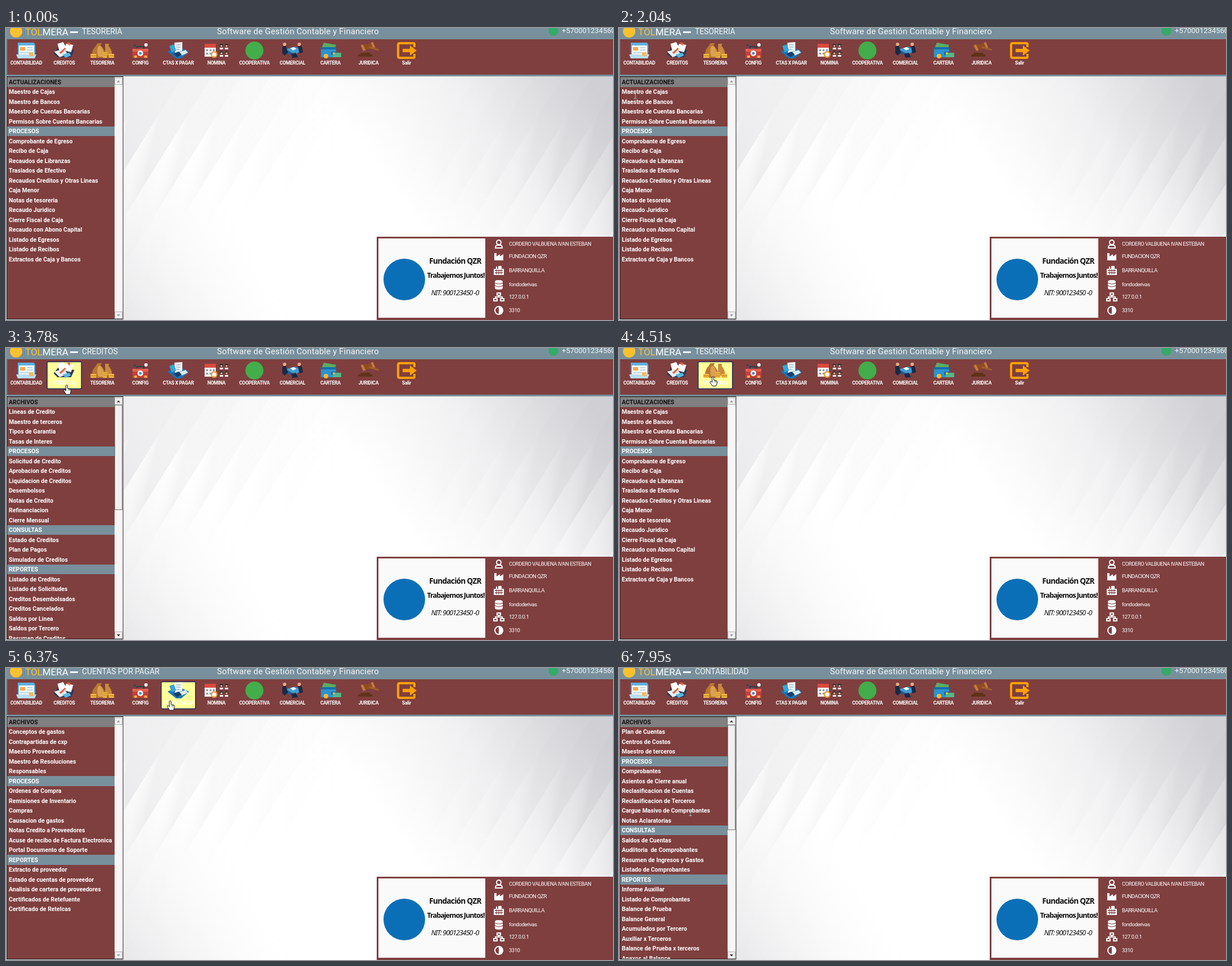
Animation, 1079 px wide and 519 px high, one loop 8 s. Source, as an HTML page:

```html
<!DOCTYPE html>
<html lang="es">
<head>
<meta charset="utf-8">
<title>Software de Gestión Contable</title>
<style>
html, body { margin: 0; width: 100%; height: 100%; overflow: hidden; background: #78909c; }
svg { display: block; font-family: Roboto, "Liberation Sans", sans-serif; }
text { white-space: pre; }
.bar { font-size: 14px; fill: #f1f5f6; }
.row { font: bold 10.5px Roboto, sans-serif; fill: #fff; }
.label { font: bold 8.6px Roboto, sans-serif; letter-spacing: -.3px; text-anchor: middle; fill: #fff; }
.info { font-size: 9.6px; letter-spacing: -.52px; fill: #fff; }
.card { font-family: "Noto Sans", "Open Sans", sans-serif; fill: #111; text-anchor: middle; }
</style>
</head>
<body>
<svg id="stage" width="1079" height="519" viewBox="0 0 1079 519"></svg>
<script>
const RED = '#7f3f3f', SLATE = '#78909c';
const rect = (x, y, w, h, fill, more = '') =>
  `<rect x="${x}" y="${y}" width="${w}" height="${h}" fill="${fill}" ${more}/>`;
const path = (fill, d, more = '') => `<path fill="${fill}" d="${d}" ${more}/>`;
const line = (color, d, width) => path('none', d, `stroke="${color}" stroke-width="${width}"`);
const disc = (x, y, r, fill) => `<circle cx="${x}" cy="${y}" r="${r}" fill="${fill}"/>`;
const text = (x, y, cls, s, more = '') => `<text x="${x}" y="${y}" class="${cls}" ${more}>${s}</text>`;
const at = (x, y, s) => `<g transform="translate(${x} ${y})">${s}</g>`;

// A leading * marks a section heading.
const lists = {
  'TESORERIA': '*ACTUALIZACIONES|Maestro de Cajas|Maestro de Bancos|Maestro de Cuentas Bancarias|Permisos Sobre Cuentas Bancarias|*PROCESOS|Comprobante de Egreso|Recibo de Caja|Recaudos de Libranzas|Traslados de Efectivo|Recaudos Creditos y Otras Lineas|Caja Menor|Notas de tesoreria|Recaudo Juridico|Cierre Fiscal de Caja|Recaudo con Abono Capital|Listado de Egresos|Listado de Recibos|Extractos de Caja y Bancos',
  'CONTABILIDAD': '*ARCHIVOS|Plan de Cuentas|Centros de Costos|Maestro de terceros|*PROCESOS|Comprobantes|Asientos de Cierre anual|Reclasificacion de Cuentas|Reclasificacion de Terceros|Cargue Masivo de Comprobantes|Notas Aclaratorias|*CONSULTAS|Saldos de Cuentas|Audiitoria  de Comprobantes|Resumen de Ingresos y Gastos|Listado de Comprobantes|*REPORTES|Informe Auxiliar|Listado de Comprobantes|Balance de Prueba|Balance General|Acumulados por Tercero|Auxiliar x Terceros|Balance de Prueba x terceros|Anexos al Balance',
  'CREDITOS': '*ARCHIVOS|Lineas de Credito|Maestro de terceros|Tipos de Garantia|Tasas de Interes|*PROCESOS|Solicitud de Credito|Aprobacion de Creditos|Liquidacion de Creditos|Desembolsos|Notas de Credito|Refinanciacion|Cierre Mensual|*CONSULTAS|Estado de Creditos|Plan de Pagos|Simulador de Creditos|*REPORTES|Listado de Creditos|Listado de Solicitudes|Creditos Desembolsados|Creditos Cancelados|Saldos por Linea|Saldos por Tercero|Resumen de Creditos',
  'CONFIGURACION': '*CONFIGURACION|Maestro de Usuarios|Maestro de Fuentes|Control de Consecutivos|Actualizacion Global Consecutivos|Datos de la Empresa|Parametros|Permisos sobre sucursales|Cambiar clave|Permisos a usuarios|Copia de Seguridad|Maestro de Retenciones|Maestro de Actividades Economicas|Maestro de Resoluciones de Facturacion|Revision de Parametros|Temas de Fondo|Maestro de UVT',
  'CUENTAS POR PAGAR': '*ARCHIVOS|Conceptos de gastos|Contrapartidas de cxp|Maestro Proveedores|Maestro de Resoluciones|Responsables|*PROCESOS|Ordenes de Compra|Remisiones de Inventario|Compras|Causacion de gastos|Notas Credito a Proveedores|Acuse de recibo de Factura Electronica|Portal Documento de Soporte|*REPORTES|Extracto de proveedor|Estado de cuentas de proveedor|Analisis de cartera de proveedores|Certificados de Retefuente|Certificado de ReteIcas'
};

const labels = ['CONTABILIDAD', 'CREDITOS', 'TESORERIA', 'CONFIG', 'CTAS X PAGAR', 'NOMINA',
  'COOPERATIVA', 'COMERCIAL', 'CARTERA', 'JURIDICA', 'Salir'];
const buttonX = i => 36 + 67.6 * i;

// Toolbar pictures, drawn around their own centre.
const icons = [
  path('#5fb0e0', 'M-15-14h29l2 5v17h-31z') + path('#f3f8fb', 'M-13-9h27v16h-27z') +
    path('#f5a94a', 'M-11-6h9v6h-9z') + line('#a9c9dc', 'M1-5h10M1-1h10M-11 4h22', 1.5) +
    path('#b9dff2', 'M-18 7h36l-3 7h-30z') + path('#f7b863', 'M5 3h8v7h-8z'),
  path('#2f3b52', 'M-19 5l8-10 29 4-6 13h-24z') + path('#fff', 'M-12-12l10-3 6 11-13 4zM3-12l13 2-4 13-12-3z') +
    path('#e9eef2', 'M-18 2l17-5 7 9-14 6z') + path('#e7663e', 'M-9 4l10-9 2 2-9 9zM5-14h6l-2 6z') + path('#5bb7dd', 'M-3 7l12-3 3 5-10 4z'),
  path('#b87830', 'M-9-13h8l-2 4q9 8 8 18l-3 4h-18q-6-10 5-22z') + path('#dba050', 'M-7-8h4q7 9 5 19h-9q-4-10 0-19z') +
    path('#c98a3c', 'M5-12h7l-1 4q7 7 6 17h-12z') + path('#f0b840', 'M-21 6h10v7h-10zM1 3h8v10h-8zM11 6h10v7h-10z') +
    line('#b9771e', 'M-21 9.5h10M1 6h8m-8 3.5h8m2 0h10', 1),
  path('#c93f39', 'M-14-3h28v16h-28z') + path('#e4614f', 'M-14-3h28v5h-28z') + line('#343d4d', 'M-6-3v-4h12v4', 2) +
    disc(0, 5, 5, '#fff') + disc(0, 5, 2.5, '#4a90b8') + disc(10, -10, 3, '#eef1f3') + disc(-10, -9, 2, '#32475b') + path('#f2b544', 'M-11 9h5v4h-5zM7 9h5v4h-5z'),
  path('#1877b7', 'M-19 2l18-9 20 9-14 12h-9z') + path('#f1f5f8', 'M-7-14l14-1v16l-13 3z') + path('#35a6dc', 'M-16-8l8-3 4 11-8 3z') +
    line('#7897ac', 'M-4-10h8m-8 4h8m-8 4h6', 1) + path('#d9eaf2', 'M2 3l11-4 4 5-11 5z') + path('#173f68', 'M-9 6l9-4 6 5-8 5z'),
  path('#f4f4f4', 'M-21-12h20v23h-20z') + path('#d94b3f', 'M-21-12h20v7h-20z') + path('#8697a5', 'M-18-2h3v3h-3zm6 0h3v3h-3zm6 0h3v3h-3zM-18 4h3v3h-3zm6 0h3v3h-3z') +
    disc(-4, 7, 6, '#f29b38') + disc(-4, 7, 3.5, '#fff') +
    [[9, -9], [18, -9], [9, 4], [18, 4]].map(([x, y]) => disc(x, y, 3, '#292b32') + disc(x, y + 1, 1.8, '#f1b68c') + path('#e8edf0', `M${x - 3} ${y + 4}h6v3h-6z`)).join(''),
  disc(0, 0, 16, '#43ad4b'),
  path('#3f9bd1', 'M-13-2l17-5 14 6-13 8z') + path('#215c91', 'M-13-2l18 9v4l-18-8z') + path('#192945', 'M-18-7l6-2 4 13-6 5-4-4zM10-7l6-2 3 12-7 2zM-2 6l8-2 4 8-10 1z') +
    disc(-14, -11, 3, '#e8ad86') + disc(12, -11, 3, '#e8ad86') + path('#fff', 'M-4-4l6-2 5 3-6 3z'),
  path('#59ae61', 'M-12-14l22 4-3 10-23-3z') + path('#2d93ce', 'M-17-6h27v18h-27z') + path('#176da8', 'M-17-6h27v4h-27zM1 2h10v6h-10z') +
    path('#55b68b', 'M4 4h15v8h-15z') + disc(-8, 10, 4, '#f3bb36') + disc(6, 5, 2, '#f3bb36'),
  path('#8d4e20', 'M-12-9l16-4 4 8-16 4z') + path('#c8793b', 'M-14-9l4-2 5 10-4 2zM4-14l4-1 4 10-4 1z') +
    line('#a65f2a', 'M1-6L18-1', 3) + path('#603315', 'M-18 7h25v4h-25zM-14 4h17v3h-17z'),
  line('#ffa000', 'M14-6V-11Q14-13 12-13H-12Q-15-13-15-10V10Q-15 13-12 13H12Q14 13 14 11V6', 4) + path('#ffa000', 'M-7-3H6v-6L18 0 6 9V3H-7z')
];

const infoIcons = [
  line('#fff', 'M-4-3a4 4 0 1 0 8 0a4 4 0 1 0-8 0M-6 7q0-5 3-5h6q3 0 3 5z', 2),
  path('#fff', 'M-8-6h4v6l6-4v4l6-4v11h-16z'),
  path('#fff', 'M-9-3h4v-4h2v4h2v-5h6v5h4v11h-18z') + line(RED, 'M-7 0h14m-14 4h14', 1.5) + line(RED, 'M-4-2v9m4-9v9m4-9v9', 1),
  path('#fff', 'M-7-5q0-3 7-3t7 3v11q0 3-7 3t-7-3z') + line(RED, 'M-7-3q7 4 14 0m-14 5q7 4 14 0', 1.2),
  line('#fff', 'M-3-7h6v4h-6zM0-3v3M-6 3V0H6V3M-9 3h6v4h-6zM3 3h6v4H3z', 2),
  `<circle r="7" fill="none" stroke="#fff" stroke-width="2"/>` + path('#fff', 'M0-7a7 7 0 0 1 0 14z')
];
const infoText = ['CORDERO VALBUENA IVAN ESTEBAN', 'FUNDACION QZR', 'BARRANQUILLA', 'fondoderivas', '127.0.0.1', '3310'];
const infoY = [384, 406, 431, 456, 478, 502];

// Adjoining slanted bands, fainter towards the white middle.
function backdrop() {
  let s = rect(209, 86, 870, 433, 'url(#left)') + rect(209, 86, 870, 433, 'url(#right)');
  for (let x = -60; x < 1079; x += 52) {
    const strength = Math.min(1, Math.abs(x + 135 - 560) / 420);
    s += path('url(#band)', `M${x} 519L${x + 270} 86h52L${x + 52} 519z`, `opacity="${strength ** 2}"`);
  }
  return `<g clip-path="url(#work)">${rect(209, 86, 870, 433, '#fff')}${s}</g>`;
}

const stop = (o, c, a = 1) => `<stop offset="${o}" stop-color="${c}" stop-opacity="${a}"/>`;
const slope = (id, x1, y1, x2, y2, stops) =>
  `<linearGradient id="${id}" gradientUnits="userSpaceOnUse" x1="${x1}" y1="${y1}" x2="${x2}" y2="${y2}">${stops}</linearGradient>`;
const defs = `<defs>
  ${slope('left', 190, 470, 430, 330, stop(0, '#e6e6e8') + stop(1, '#fff', 0))}
  ${slope('right', 740, 360, 1060, 130, stop(0, '#b4b4bb', 0) + stop(.5, '#b4b4bb', .18) + stop(1, '#b4b4bb', .55))}
  <linearGradient id="band" x1=".4" y1=".47" x2=".6" y2=".53">${stop(0, '#fff', .35)}${stop(.5, '#fff', 0)}${stop(1, '#a0a0a8', .16)}</linearGradient>
  <clipPath id="work">${rect(209, 86, 870, 433, '#000')}</clipPath>
  <clipPath id="rows">${rect(2, 87, 191, 430, '#000')}</clipPath>
</defs>`;

function menu(name) {
  const items = lists[name].split('|'), long = items.length > 24;
  const rows = items.map((item, i) => {
    const head = item[0] === '*', y = 87 + 17.5 * i, top = Math.round(y);
    return (head ? rect(2, top, 191, Math.round(y + 17.5) - top, i ? SLATE : '#808080') : '') +
      text(5, y + 12.5, 'row', head ? item.slice(1) : item, head && !i ? 'style="fill:#111"' : '');
  }).join('');
  const ink = long ? '#301818' : '#9a9a9a', edge = 'stroke="#b4b4b4"';
  return rect(1.5, 86.5, 206.5, 431, RED, 'stroke="#111"') + `<g clip-path="url(#rows)">${rows}</g>` +
    rect(193, 87, 14.5, 430, '#f6f6f6') +
    rect(193.5, 88.5, 13, 12, '#f0f0f0', edge) + rect(193.5, 504.5, 13, 12, '#f0f0f0', edge) +
    path(ink, 'M197 96.5l3-3.5 3 3.5z') + path(ink, 'M197 509l3 3.5 3-3.5z') +
    (long ? rect(193.5, 101.5, 13, 186, '#f0f0f0', 'stroke="#777"') : '');
}

const cursors = {
  hand: path('#fff', 'M-1.5 .5Q0-1 1.5 .5V6L6 7.2Q8 7.6 7.6 10L6.7 14Q6.3 16 5 16.5H-1L-5.2 10Q-5.5 8-3.6 8.3L-1.5 10z', 'stroke="#111"') +
    line('#111', 'M3.4 7v3M5.4 7.4v3', .7),
  arrow: path('#fff', 'M0 0V13L3 10.3 5 15 7 14 5 9.5H9.2z', 'stroke="#222" stroke-width=".9"'),
  beam: line('#9fc3c6', 'M-2.5-5.5H2.5M0-5.5V5.5M-2.5 5.5H2.5', 1)
};

document.getElementById('stage').innerHTML = defs + rect(0, 0, 1079, 519, SLATE) +
  disc(18, 6, 11, '#fbc02d') +
  `<text x="34" y="12.5" font-size="17" fill="#fff"><tspan fill="#fbc02d">TOL</tspan>MERA</text>` +
  rect(114, 6, 14, 3, '#fff') + text(135, 11, 'bar', '', 'id="title" letter-spacing="-.1"') +
  text(375, 11, 'bar', 'Software de Gestión Contable y Financiero', 'style="font-size:15px;letter-spacing:.13px"') +
  disc(973, 5, 9, '#35a968') + text(988, 9, 'bar', '+570001234560', 'style="font-size:13px"') +
  rect(2, 20, 1077, 63, RED) +
  rect(0, 24.5, 61, 48, '#ffff99', 'id="hover" rx="2" stroke-width="1.5"') +
  labels.map((s, i) => at(buttonX(i), 40, icons[i]) + text(buttonX(i), 65, 'label', s)).join('') +
  rect(0, 86, 209, 433, '#f4f4f4') + '<g id="menu"></g>' + backdrop() +
  rect(659, 371, 420, 148, RED) + rect(662, 374, 190, 141, '#fafafa') + disc(708, 447, 37, '#0b6fb8') +
  text(798.5, 419, 'card', 'Fundación QZR', 'font-size="13.6" font-weight="bold" letter-spacing="-.7"') +
  text(799.5, 444, 'card', 'Trabajemos Juntos!', 'font-size="12.6" font-weight="bold" letter-spacing="-1"') +
  text(798, 475, 'card', 'NIT: 900123450 -0', 'font-size="12.5" font-style="italic" letter-spacing="-1"') +
  infoIcons.map((s, i) => at(876, infoY[i], s) + text(894, infoY[i] + 3, 'info', infoText[i])).join('') +
  '<g id="cursor"></g>';

const [title, menuBox, hover, cursor] = ['title', 'menu', 'hover', 'cursor'].map(id => document.getElementById(id));

// Time, x, y of the pointer tip.
const route = [[330, 167, 56], [700, 150, 52], [1080, 112, 55], [1300, 95, 50], [1600, 45, 55], [1800, 34, 95],
  [1930, 29, 120], [2060, 29, 120], [2350, 36, 52], [2730, 44, 56], [3000, 100, 60], [3130, 108, 66], [4310, 108, 66],
  [4450, 167, 51], [4600, 167, 51], [4900, 238, 54], [5200, 240, 56], [5700, 314, 45], [5940, 314, 45], [6200, 325, 58],
  [6750, 90, 62], [6930, 70, 40], [7060, 70, 40], [7250, 42, 50], [7620, 50, 56], [7750, 62, 90], [7850, 90, 170], [7930, 127, 257]];
const presses = [[0, 2], [2400, 0], [3100, 1], [4330, 2], [4950, 3], [5880, 4], [7200, 0]];
const views = [[0, 'TESORERIA'], [2500, 'CONTABILIDAD'], [3700, 'CREDITOS'], [4400, 'TESORERIA'],
  [5020, 'CONFIGURACION'], [5900, 'CUENTAS POR PAGAR'], [7300, 'CONTABILIDAD']];
const latest = (events, t) => events.filter(e => e[0] <= t).pop()[1];

function pointer(t) {
  const n = route.findIndex(p => p[0] > t);
  if (n < 0) return route[route.length - 1].slice(1);
  const a = route[n - 1], b = route[n], k = (t - a[0]) / (b[0] - a[0]), e = k * k * (3 - 2 * k);
  return [a[1] + (b[1] - a[1]) * e, a[2] + (b[2] - a[2]) * e];
}

let shownView, shownCursor;
function draw() {
  const now = performance.now() % 8000, step = 1000 / 15;
  const t = now < 330 ? 0 : 330 + Math.floor((now - 330) / step) * step;
  const view = latest(views, t);
  if (view !== shownView) {
    title.textContent = shownView = view;
    menuBox.innerHTML = menu(view);
  }
  cursor.style.display = hover.style.display = 'none';
  if (t >= 330) {
    const [x, y] = pointer(t), i = Math.round((x - 36) / 67.6);
    const over = Math.abs(x - buttonX(i)) < 31 && y > 24 && y < 73;
    const kind = over ? 'hand' : y > 87 && x < 193 ? 'beam' : 'arrow';
    if (kind !== shownCursor) cursor.innerHTML = cursors[shownCursor = kind];
    cursor.setAttribute('transform', `translate(${x} ${y})`);
    cursor.style.display = '';
    if (over) {
      hover.setAttribute('x', buttonX(i) - 30.5);
      hover.setAttribute('stroke', latest(presses, t) === i ? '#1d2a5c' : '#e8dca0');
      hover.style.display = '';
    }
  }
  requestAnimationFrame(draw);
}
draw();
</script>
</body>
</html>
```
